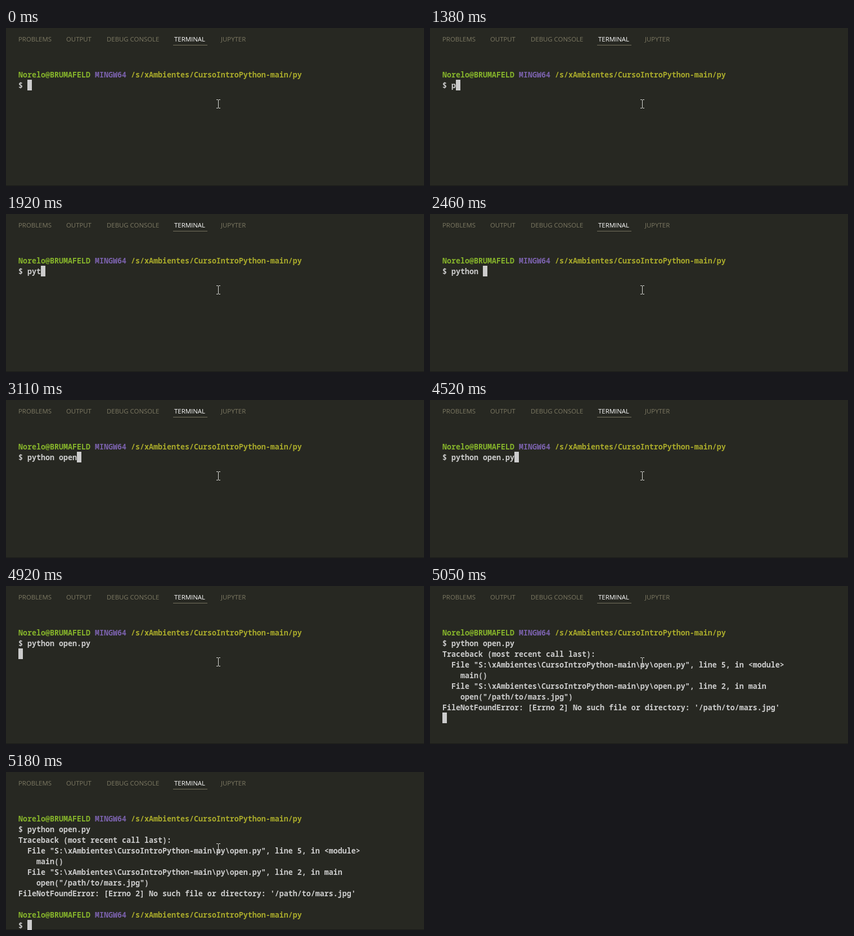
Animation of 743 by 281 pixels, one loop 9390 ms. Source, as an HTML page:

```html
<!DOCTYPE html>
<html lang="en">
<head>
<meta charset="utf-8">
<title>Terminal session</title>
<style>
  html, body { margin: 0; width: 100%; height: 100%; overflow: hidden; background: #272822; }
  #stage { position: relative; width: 743px; height: 281px; overflow: hidden; background: #272822; }
  #stage::after { content: ""; position: absolute; left: 0; top: 280px; width: 743px; height: 1px; background: #1b1c18; }
  .tab { position: absolute; top: 12px; font: 11.4px/16px "Open Sans", "Noto Sans", sans-serif; color: #7d7963; white-space: pre; }
  .tab.on { color: #fff; font-weight: 500; }
  .tab.on::after { content: ""; position: absolute; left: -2px; width: 61px; top: 18px; height: 1px; background: #75715e; }
  .row { position: absolute; left: 22px; height: 19px; overflow: hidden; white-space: pre; color: #ccc;
         font: 600 13.3333px/19px "Noto Sans Mono", "DejaVu Sans Mono", monospace; font-variant-ligatures: none; }
  .user { color: #86b42b; }
  .sys { color: #7b62ad; }
  .path { color: #a9aa2b; }
  #cursor { position: absolute; left: 22px; top: 73px; width: 8px; height: 19px; background: #ccc; z-index: 2; }
  #mouse { position: absolute; left: 374px; top: 127px; z-index: 3; }
</style>
</head>
<body>
<div id="stage">
  <div id="cursor"></div>
  <svg id="mouse" width="8" height="16" shape-rendering="crispEdges">
    <path d="M0 .5H3M4 .5H7M3.5 1V15M0 15.5H3M4 15.5H7" fill="none" stroke="#d8d8d4"/>
  </svg>
</div>
<script>
const LOOP = 9390, CELL = 8, LINE = 19, TOP = 74;
const ENTER = 4920, OUTPUT = 5050, PROMPT = 5180;
const command = "python open.py";
const keyTimes = [1380, 1650, 1860, 1925, 1990, 2130, 2460, 2790, 2850, 3070, 3110, 3840, 4120, 4520];
const stage = document.getElementById("stage");

function add(parent, cls, text) {
  const el = document.createElement("div");
  el.className = cls;
  el.textContent = text;
  return parent.appendChild(el);
}

function row(n, text, col = 0) {
  const el = add(stage, "row", text);
  el.style.top = TOP + n * LINE + "px";
  el.style.left = 22 + col * CELL + "px";
  return el;
}

function prompt(n) {
  const el = row(n, "");
  const parts = [["user", "Norelo@BRUMAFELD"], ["sys", " MINGW64"], ["path", " /s/xAmbientes/CursoIntroPython-main/py"]];
  for (const [cls, text] of parts) {
    const span = document.createElement("span");
    span.className = cls;
    span.textContent = text;
    el.append(span);
  }
  return [el, row(n + 1, "$")];
}

// Plays [ms, value] steps as hard changes of one property.
function play(el, prop, steps) {
  const frames = steps.map(([ms, v]) => ({ offset: ms / LOOP, [prop]: v, easing: "steps(1, end)" }));
  frames.push({ offset: 1, [prop]: steps[steps.length - 1][1] });
  el.animate(frames, { duration: LOOP, iterations: Infinity });
}

const showAt = (el, ms) => play(el, "opacity", [[0, 0], [ms, 1]]);
const cell = (col, line) => `translate(${col * CELL}px, ${line * LINE}px)`;

[["PROBLEMS", 22], ["OUTPUT", 107], ["DEBUG CONSOLE", 179], ["TERMINAL", 299], ["JUPYTER", 382]].forEach(([name, x]) => {
  add(stage, name === "TERMINAL" ? "tab on" : "tab", name).style.left = x + "px";
});

prompt(0);
const typed = row(1, command, 2);
const output = String.raw`Traceback (most recent call last):
  File "S:\xAmbientes\CursoIntroPython-main\py\open.py", line 5, in <module>
    main()
  File "S:\xAmbientes\CursoIntroPython-main\py\open.py", line 2, in main
    open("/path/to/mars.jpg")
FileNotFoundError: [Errno 2] No such file or directory: '/path/to/mars.jpg'`.split("\n");

play(typed, "width", [[0, "0px"], ...keyTimes.map((ms, i) => [ms, (i + 1) * CELL + "px"])]);
output.forEach((text, i) => showAt(row(i + 2, text), OUTPUT));
prompt(9).forEach(el => showAt(el, PROMPT));

play(document.getElementById("cursor"), "transform", [
  [0, cell(2, 1)],
  ...keyTimes.map((ms, i) => [ms, cell(i + 3, 1)]),
  [ENTER, cell(0, 2)],
  [OUTPUT, cell(0, 8)],
  [PROMPT, cell(2, 10)]
]);
</script>
</body>
</html>
```
